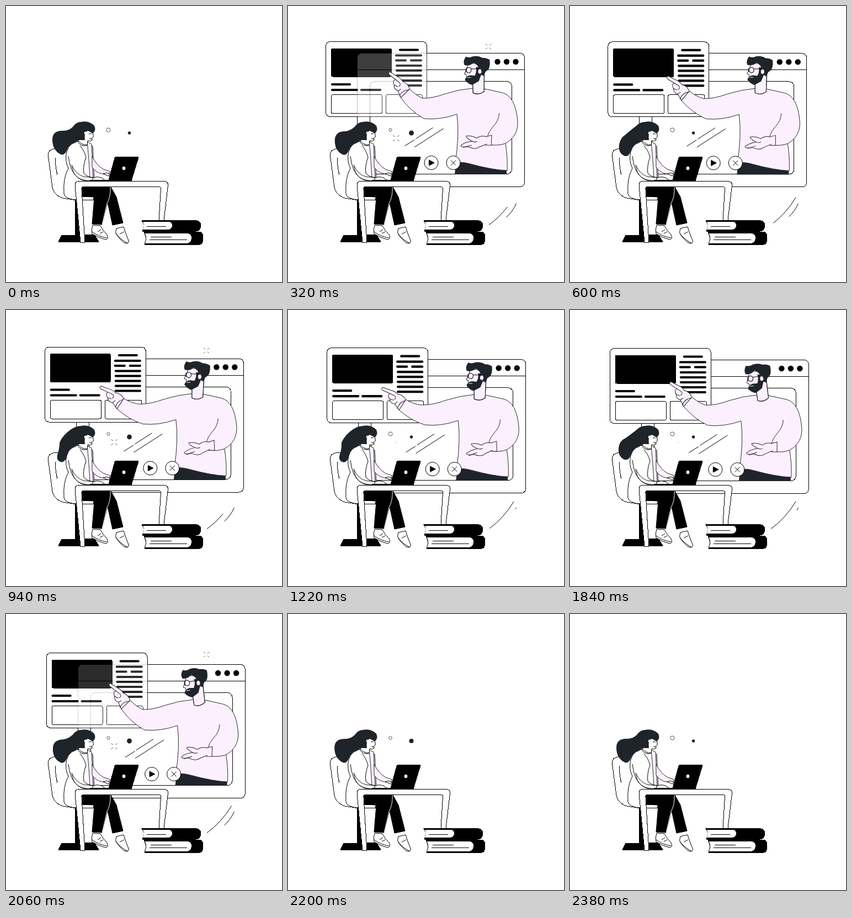
An HTML page that plays this animation: 500 px wide and 500 px high, repeating every 2400 ms.

```html
<!DOCTYPE html>
<html lang="en">
<head>
<meta charset="utf-8">
<title>Online lesson</title>
<style>
  html, body { margin: 0; width: 100%; height: 100%; overflow: hidden; background: #fff; }
  svg { display: block; width: 100vw; height: 100vh; }
  .ln { fill: none; }
  .ink { fill: #000; }
  .dark { fill: #1f242b; stroke: none; }
  .pink { fill: #fcf0ff; stroke: #2a2830; }
  .soft { fill: none; stroke: #2a2830; }
  .bar { stroke-width: 4.2; stroke-linecap: round; fill: none; shape-rendering: auto; }
  .crisp { shape-rendering: crispEdges; }
</style>
</head>
<body>
<svg viewBox="0 0 500 500" fill="#fff" stroke="#000" stroke-width="1" stroke-linejoin="round">
  <defs>
    <g id="panel" class="crisp">
      <rect x="68.5" y="64.5" width="183" height="136" rx="8"/>
      <rect class="ink" x="78" y="76.5" width="110" height="52" rx="3" stroke="none"/>
      <path class="bar" d="M203 79.500H235 M196 89.500H241 M196 98.500H213 M223 98.500H241 M197 108H241 M197 117H241 M197 126H241 M197 135H241 M197 144H241 M80 142H112 M80 152H125 M133 152H167"/>
      <rect x="78.500" y="160.500" width="92" height="34" rx="3"/>
      <rect x="177.500" y="160.500" width="66" height="34" rx="3"/>
    </g>
    <path id="spark" class="ln" d="M-2.500 -2.500L-5.500 -5.500M2.500 -2.500L5.500 -5.500M-2.500 2.500L-5.500 5.500M2.500 2.500L5.500 5.500"/>
  </defs>

  <g id="screen">
    <use href="#panel" id="back"/>
    <g id="window">
      <g class="crisp">
        <rect x="125.500" y="85.500" width="303" height="242" rx="8"/>
        <path class="ln" d="M125.500 115.500H428.500"/>
        <rect x="148.500" y="136.500" width="257" height="168" rx="9"/>
      </g>
      <g class="ink" stroke="none"><circle cx="379.500" cy="101" r="5.200"/><circle cx="396" cy="101" r="5.200"/><circle cx="412.500" cy="101" r="5.200"/></g>
      <path class="ln" d="M211.500 253.500L229 242.500M231.500 240.500L262.500 220.500M229.500 255.500L281.500 222"/>
    </g>
    <use href="#panel" id="front"/>
    <g id="man">
      <path class="dark" d="M302 305L303.500 291L309 282L345 284L396 297V305Z"/>
      <path class="pink" id="torso"/>
      <path class="soft" d="M382.500 194Q382 208 371 219Q364 227 361 237M394 249Q380 254 364 251"/>
      <g id="palm">
        <path class="pink" stroke="none" d="M361 237L372 234V252H362Z"/>
        <path class="pink" d="M363 237Q353 234 345 240Q335 235 326 237Q325 240 337 246Q324 248 317 254Q316 258 330 256Q343 262 350 256L364 250"/>
        <path class="soft" d="M337 246Q342 248 346 246M321 258L336 253"/>
      </g>
      <g id="point">
        <path class="pink" d="M211 158Q206 149 196 148Q192 143 184 141L170 136Q166 137 169 141L182 147Q177 151 182 157Q183 165 191 166L199 177Z"/>
        <path class="soft" d="M182 147L191 151Q195 156 190 158M182 157L189 159M191 166L196 162M196 175Q199 162 211 160"/>
      </g>
      <g id="head">
        <path class="pink" stroke="none" d="M335 126L357 114L355 155Q345 162 335 157Z"/>
        <path class="soft" d="M335 135V157Q345 162 355 155L356 122"/>
        <path class="pink" d="M328 103L325 113L320.500 122L324 124L325 131H344L351 104Z"/>
        <path class="dark" d="M321 133Q323 126 331 125L339 126Q343 120 342 110L349 112L351 124L346 136L334 142.500Q327 141 321 133Z"/>
        <path class="dark" d="M321 106Q318 99 324 91Q330 94 336 91Q346 89 354 94Q362 94 367 98Q368 107 365 114Q362 118 359 119L355 127L350 124L350 114Q345 112 345 108L338 102Q330 109 321 106Z"/>
        <ellipse class="pink" stroke="none" cx="348.500" cy="118.500" rx="3.500" ry="4.500"/>
        <path class="ln" d="M325 129H332" stroke="#fcf0ff"/>
        <ellipse class="ln" cx="328.500" cy="115.500" rx="4.500" ry="5"/>
        <path class="ln" d="M333 113.500L346 113.500M323.500 112V119"/>
      </g>
    </g>
    <g id="buttons">
      <circle cx="259.500" cy="284" r="12.500"/>
      <path class="ink" d="M255.500 279V289L265 284Z"/>
      <circle cx="299.500" cy="284" r="12.500"/>
      <path class="ln" d="M295 279.500L304 288.500M304 279.500L295 288.500"/>
    </g>
  </g>

  <!-- chair -->
  <g class="crisp">
    <path class="ink" d="M125 350H137V414H160L168 427H95L101 415H125Z"/>
    <path d="M91 258.500Q75 259 76.500 272L84 328Q87 343 103 348L125 351.500H158.500V345H125L125 265Q115 258 91 258.500Z"/>
    <path class="ln" d="M89.500 275Q89 290 93 306"/>
  </g>

  <!-- woman -->
  <path d="M131 245Q115 247 110 264Q106 280 113 294Q103 312 105 340Q106 349 125 351L138 345V328L160 317L157 254L147 247Z"/>
  <path class="ink" d="M138 328H190L200 346L212 393L193 397L184 356L174 396L156 395L160 346L138 345Z"/>
  <path class="ln" stroke="#fff" d="M189 328Q190 345 183 358L174 396"/>
  <path d="M157 397L171 398Q176 408 183 414Q187 423 180 423Q168 420 156 413Q154 405 157 397Z"/>
  <path d="M200 403L213 400Q217 413 222.500 426Q222 432 214 429Q201 418 198.500 410Z"/>
  <path class="ln" d="M166 409L172 405M170 412L176 409M156 409Q168 418 183 420M206 413L214 409M199 412Q208 424 221 430"/>
  <path class="pink" d="M147 246L155 250L158 316H152Q151 285 147 246Z"/>
  <path class="pink" d="M156 272Q164 289 177 296L189 300L186 305L174 304Q163 302 156 292Z"/>
  <path class="pink" d="M119 288Q126 304 140 309L158 311V317L143 317Q128 313 122 301Z" stroke="none"/>
  <path class="ln" d="M113 272Q116 300 130 311Q140 317 157 317M134 253Q142 262 145 274Q139 290 141 303Q146 310 160 311M130 246Q137 256 147 252"/>
  <path d="M158 311Q165 308 173 311L180 316H156ZM176 304Q182 301 188 304L186 308Z"/>
  <path d="M142 224L157 228L158.500 237L155.500 239L156 243Q153 246 148 244L147 252Q137 252 131 244Z"/>
  <path class="dark" id="hair"/>
  <path d="M146 228Q141 226 142 232L146 234" stroke="none"/>
  <path class="ln" d="M150 232Q153 230 155 232M151 240L155 241"/>

  <!-- desk and laptop -->
  <g class="crisp">
    <path d="M131 317.500H287Q294 318 293.500 325L286 388H277L280.500 331Q281 327.500 277 327.500H139Q136.500 327.500 137 332L143 428.500H135L125 325Q125 318 131 317.500Z"/>
    <path class="ink" d="M152 315.500H186L197 275Q198 273 200 273H238Q240 273 239.500 276L227 317H152Z"/>
  </g>
  <ellipse cx="213.500" cy="294" rx="2.800" ry="3.300" stroke="none"/>

  <!-- books -->
  <g class="crisp">
    <path class="ink" d="M246 388.500H343Q353 389 353 398Q352 408 344 408H247L251 398Z"/>
    <path d="M248 391H296Q301 392 301 398Q300 404 295 405H248Q252 398 248 391Z" stroke="none"/>
    <path class="ln" d="M255 399.500H290"/>
    <path class="ink" d="M250 409H350Q358 410 357 421Q357 431 351 432H251L254 421Z"/>
    <path d="M252 412H329Q336 413 336 421Q335 429 328 430H252Q256 421 252 412Z" stroke="none"/>
    <path class="ln" d="M260 423.500H328M262 418.500H300"/>
  </g>

  <circle id="ring" cx="185.500" cy="224.500" stroke="#555"/>
  <circle id="dot" class="dark" cx="223.500" cy="230"/>
  <g id="fx">
    <use href="#spark" id="sparkA" stroke="#333"/>
    <use href="#spark" id="sparkB" stroke="#333"/>
    <path class="ln" id="arcA" pathLength="100" d="M364 396.500Q390 378 409 347"/>
    <path class="ln" id="arcB" pathLength="100" d="M395.500 382.500Q406 374 413.500 358"/>
  </g>
</svg>
<script>
const LOOP = 2400, BEAT = 600;
const $ = id => document.getElementById(id);
const set = (id, attrs) => { for (const k in attrs) $(id).setAttribute(k, attrs[k]); };
const show = (id, on) => { $(id).style.display = on ? '' : 'none'; };
const clamp = v => Math.max(0, Math.min(1, v));
const cubic = u => u < .5 ? 4 * u ** 3 : 1 - 4 * (1 - u) ** 3;
const smooth = u => u * u * (3 - 2 * u);

// Piecewise track of [time, value] pairs
function track(keys, t, ease = u => u) {
  let i = 1;
  while (i < keys.length - 1 && t > keys[i][0]) i++;
  const [t0, a] = keys[i - 1], [t1, b] = keys[i];
  return a + (b - a) * ease(clamp((t - t0) / (t1 - t0)));
}

const driftX = [[540, 0], [940, 1.8], [1220, 2.2], [1620, 3.1], [2060, 4.6], [2400, 5]];
const driftY = [[540, 0], [940, 2.5], [1220, 4.2], [1620, 4], [2060, 6], [2400, 6.5]];
const nod = [[0, -4], [600, 0], [940, 1], [1220, .5], [1620, -10], [2060, -8.5], [2400, -4]];
const headA = [[0, .08], [.05, 0], [.7, 0], [.701, 1], [1, .06]];
const tailA = [[.433, 1], [.567, .6], [.7, 0], [.701, 1]];
const headB = [[0, 0], [.033, .92], [.4, 0]];
const tailB = [[.6, 1], [.7, .85], [.85, .7], [1, 1]];

// Arm points turn around the elbow
function turn(x, y, deg) {
  const a = deg * Math.PI / 180, c = Math.cos(a), s = Math.sin(a);
  const dx = x - 250, dy = y - 195;
  return `${250 + dx * c - dy * s} ${195 + dx * s + dy * c}`;
}

function torso(deg) {
  return `M${turn(199, 177, deg)}Q${turn(222, 197, deg)} 246 204Q275 207 306 196Q311 232 303 285`
    + `Q312 281 330 286Q370 297 397 298Q398 272 394 249Q418 235 416 208`
    + `Q412 163 388 157L356 150Q345 160 335 149Q310 151 285 159Q260 168 ${turn(240, 168, deg / 2)}`
    + `Q${turn(226, 167, deg)} ${turn(211, 158, deg)}Z`;
}

function hair(p) {
  const m = (x0, y0, x1, y1) => `${x0 + (x1 - x0) * p} ${y0 + (y1 - y0) * p} `;
  return 'M136 210Q150 207 160 217Q164 225 157 231L149 226Q141 227 143 243L138 243Q131 242 125 248Q'
    + m(113, 252, 113, 251) + m(111, 262, 109, 264) + 'Q' + m(109, 275, 104, 273) + m(101, 276, 96, 267)
    + 'Q' + m(90, 274, 84, 259) + m(94, 261, 84, 242) + 'Q' + m(97, 254, 84, 225) + m(97, 240, 104, 226)
    + 'Q' + m(103, 226, 114, 226) + m(118, 216, 121, 219) + 'Q127 210 136 210Z';
}

function stroke(id, from, to) {
  const len = Math.max(0, to - from) * 100;
  set(id, { 'stroke-dasharray': `0 ${from * 100} ${len} 200`, opacity: len > 1 ? 1 : 0 });
}

function draw(now) {
  const t = now % LOOP, beat = t % BEAT / BEAT;
  const pulse = (1 - Math.cos(beat * 2 * Math.PI)) / 2;
  const swing = cubic(Math.abs(t - LOOP / 2) / (LOOP / 2));
  const arm = swing * 14;

  const shown = t > 200 && t < 2200;
  const fade = Math.min(clamp((t - 140) / 240), clamp((2250 - t) / 230));
  for (const id of ['window', 'man', 'buttons', 'front', 'fx']) show(id, shown);
  show('back', fade >= .5);
  set('front', { opacity: fade });

  set('screen', { transform: `translate(${track(driftX, t)} ${track(driftY, t)})` });
  set('torso', { d: torso(arm) });
  set('point', { transform: `rotate(${arm} 250 195)` });
  set('palm', { transform: `rotate(${(arm - 7) * .35} 362 200) translate(${(7 - arm) * .3} 0)` });
  set('head', { transform: `rotate(${track(nod, t, smooth)} 350 150)` });
  set('hair', { d: hair(swing) });

  set('ring', { r: 3.6 - pulse });
  set('dot', { r: 2.7 + 1.8 * pulse });
  const size = pulse > .002 ? .3 + .7 * pulse : 0;
  set('sparkA', { transform: `translate(363 73.500) scale(${pulse > .1 ? size * .9 : 0})` });
  set('sparkB', { transform: `translate(196 239.500) scale(${size})` });
  stroke('arcA', track(headA, beat), track(tailA, beat));
  stroke('arcB', track(headB, beat), track(tailB, beat));
}

function tick() {
  draw(performance.now());
  requestAnimationFrame(tick);
}
tick();
</script>
</body>
</html>
```
